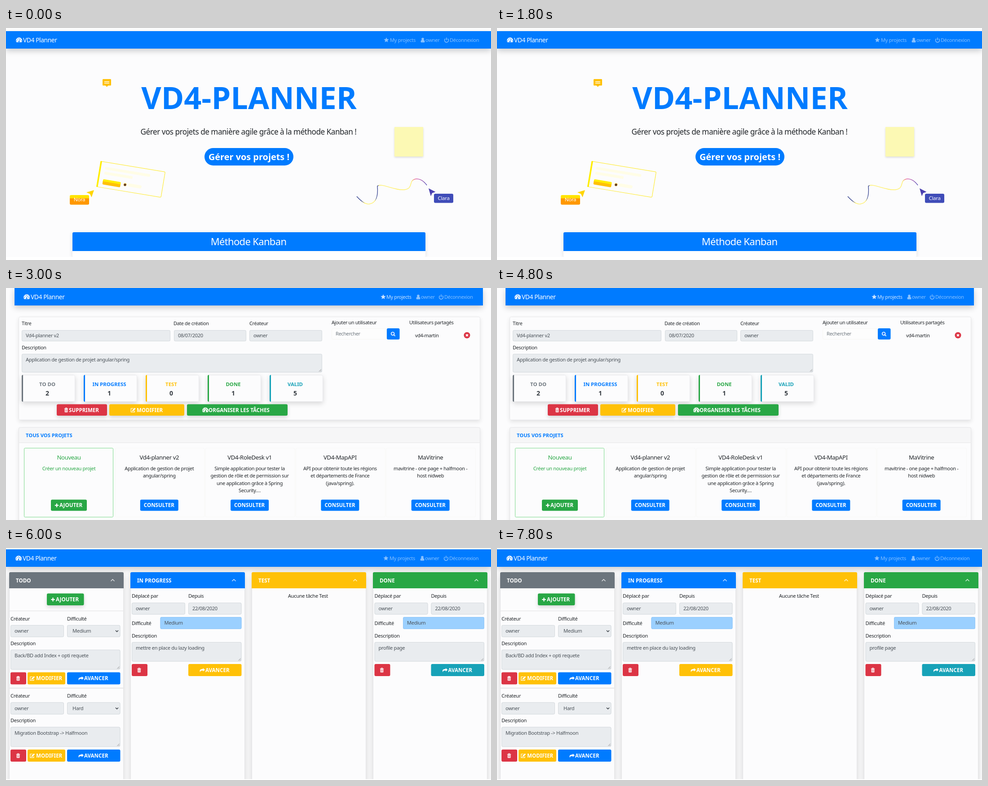
Animation of 1080x518 px, one loop 9 s. Source, as an HTML page with a canvas:

```html
<!DOCTYPE html>
<html lang="fr">
<head>
<meta charset="utf-8">
<title>Kanban</title>
<style>
html, body { margin: 0; width: 100%; height: 100%; overflow: hidden; background: #fcfcfd; }
canvas { display: block; width: 1080px; height: 518px; }
</style>
</head>
<body>
<canvas id="stage"></canvas>
<script>
const W = 1080, H = 518, HOLD = 3000;
const BLUE = '#007bff', GREEN = '#28a745', GOLD = '#ffc107', RED = '#dc3545';
const GREY = '#6c757d', TEAL = '#17a2b8', INK = '#212529', FIELD = '#495057';
const PAPER = '#fcfcfd';
const BRAND = 'VD4 Planner', USER = 'owner';

const canvas = document.getElementById('stage');
const ctx = canvas.getContext('2d');
const dpr = window.devicePixelRatio || 1;
canvas.width = W * dpr;
canvas.height = H * dpr;

// y is the middle of the capitals
function text(str, x, y, size, color = INK, { bold = false, align = 'left' } = {}) {
  ctx.font = `${bold ? 700 : 400} ${size}px "Noto Sans", "Open Sans", sans-serif`;
  ctx.letterSpacing = bold ? '0px' : `${-0.03 * size}px`;
  ctx.textAlign = align;
  ctx.fillStyle = color;
  ctx.fillText(str, x, y + size * 0.36);
}

const centered = (str, x, y, size, color, bold = false) =>
  text(str, x, y, size, color, { bold, align: 'center' });
const strong = (str, x, y, color = '#fff', size = 11.6) => text(str, x, y, size, color, { bold: true });

function box(x, y, w, h, fill, { r = 3, line, shadow = 0, alpha = 0.15, drop = 4 } = {}) {
  ctx.save();
  if (shadow) {
    ctx.shadowColor = `rgba(0,0,0,${alpha})`;
    ctx.shadowBlur = shadow * dpr;
    ctx.shadowOffsetY = drop * dpr;
  }
  ctx.beginPath();
  ctx.roundRect(x, y, w, h, r);
  ctx.fillStyle = fill;
  ctx.fill();
  ctx.restore();
  if (line) {
    ctx.beginPath();
    ctx.roundRect(x + 0.5, y + 0.5, w - 1, h - 1, r);
    ctx.strokeStyle = line;
    ctx.lineWidth = 1;
    ctx.stroke();
  }
}

function path(points, close = false) {
  ctx.beginPath();
  points.forEach(([x, y], i) => i ? ctx.lineTo(x, y) : ctx.moveTo(x, y));
  if (close) ctx.closePath();
}

function fillPath(points, color) {
  path(points, true);
  ctx.fillStyle = color;
  ctx.fill();
}

function dot(x, y, r, color) {
  ctx.beginPath();
  ctx.arc(x, y, r, 0, Math.PI * 2);
  if (color) ctx.fillStyle = color;
  ctx.fill();
}

// Icons are drawn around the origin
const icons = {
  gauge(color, back) {
    ctx.beginPath();
    ctx.arc(0, 1, 6.8, Math.PI * 0.82, Math.PI * 2.18);
    ctx.closePath();
    ctx.fill();
    ctx.fillStyle = back;
    for (const a of [1, 1.25, 1.5, 1.75, 2]) {
      dot(4.7 * Math.cos(a * Math.PI), 1.4 + 4.7 * Math.sin(a * Math.PI), 0.95);
    }
    dot(0, 3, 1.6);
    ctx.strokeStyle = back;
    path([[0, 3], [1.2, -1.8]]);
    ctx.stroke();
  },
  star() {
    const pts = Array.from({ length: 10 }, (_, i) => {
      const r = i % 2 ? 2.7 : 6, a = (i / 5 - 0.5) * Math.PI;
      return [r * Math.cos(a), r * Math.sin(a)];
    });
    path(pts, true);
    ctx.fill();
  },
  user() {
    dot(0, -2.4, 2.8);
    ctx.beginPath();
    ctx.roundRect(-4.4, -0.3, 8.8, 5.5, [3, 3, 1.5, 1.5]);
    ctx.fill();
  },
  power() {
    ctx.lineWidth = 1.6;
    ctx.beginPath();
    ctx.arc(0, 0.5, 4.4, -Math.PI * 0.28, Math.PI * 1.28);
    ctx.moveTo(0, -5.4);
    ctx.lineTo(0, 0);
    ctx.stroke();
  },
  trash(color, back) {
    ctx.fillRect(-4.2, -3.7, 8.4, 1.3);
    ctx.strokeRect(-1.6, -4.8, 3.2, 1.5);
    ctx.beginPath();
    ctx.roundRect(-3.4, -2, 6.8, 7, 1);
    ctx.fill();
    ctx.fillStyle = back;
    for (const x of [-1.8, 0, 1.8]) ctx.fillRect(x - 0.35, -0.8, 0.7, 4.4);
  },
  edit() {
    ctx.lineWidth = 1.2;
    path([[1, -3.8], [-4.6, -3.8], [-4.6, 4.4], [3.4, 4.4], [3.4, 1.2]]);
    ctx.stroke();
    path([[3.6, -5], [5.6, -3], [0.4, 2.2], [-2, 2.6], [-1.6, 0.2]], true);
    ctx.fill();
  },
  share() {
    ctx.beginPath();
    ctx.moveTo(6, -0.9);
    ctx.lineTo(1.6, -4.8);
    ctx.lineTo(1.6, -2.6);
    ctx.bezierCurveTo(-5, -2.6, -7, 0, -4.4, 4.8);
    ctx.bezierCurveTo(-4.6, 1.4, -2.6, 0.8, 1.6, 0.8);
    ctx.lineTo(1.6, 3);
    ctx.closePath();
    ctx.fill();
  },
  plus() {
    ctx.fillRect(-4.2, -1.1, 8.4, 2.2);
    ctx.fillRect(-1.1, -4.2, 2.2, 8.4);
  },
  search() {
    ctx.lineWidth = 1.7;
    ctx.beginPath();
    ctx.arc(-0.9, -0.9, 3.4, 0, Math.PI * 2);
    ctx.moveTo(1.7, 1.7);
    ctx.lineTo(4.6, 4.6);
    ctx.stroke();
  },
  cross() {
    ctx.lineWidth = 2;
    path([[-2.3, -2.3], [2.3, 2.3]]);
    ctx.stroke();
    path([[2.3, -2.3], [-2.3, 2.3]]);
    ctx.stroke();
  },
  up() {
    ctx.lineWidth = 1.3;
    path([[-4, 2], [0, -2], [4, 2]]);
    ctx.stroke();
  },
  down() {
    ctx.lineWidth = 1.5;
    path([[-3, -1.5], [0, 1.5], [3, -1.5]]);
    ctx.stroke();
  }
};

function icon(name, x, y, color = '#fff', back = BLUE) {
  ctx.save();
  ctx.translate(x, y);
  ctx.fillStyle = ctx.strokeStyle = color;
  ctx.lineWidth = 1;
  icons[name](color, back);
  ctx.restore();
}

function button(x, y, w, h, fill, label, labelX, sign, signX, shadow = 0) {
  box(x, y, w, h, fill, { shadow });
  const mid = y + h / 2 + 0.3;
  if (sign) icon(sign, signX, mid, '#fff', fill);
  if (label) strong(label, labelX, mid);
}

function navbar(x, y, w, h, left, links, size, glow) {
  box(x, y, w, h, BLUE, { r: 0, shadow: 14, alpha: 0.2, drop: 5 });
  const mid = y + h / 2 + 0.5;
  icon('gauge', left, mid);
  text(BRAND, left + 9, mid, 13.8, '#fff');
  const soft = 'rgba(255,255,255,.52)';
  const items = [['star', 'My projects', glow], ['user', USER, soft], ['power', 'Déconnexion', soft]];
  items.forEach(([sign, label, color], i) => {
    const [iconX, labelX] = links[i];
    icon(sign, iconX, mid, color);
    text(label, labelX, mid, size, color);
  });
}

function field(x, y, w, h, value, { fill = '#e9ecef', line = '#d5dade', textY = y + h / 2, inset = 9 } = {}) {
  box(x, y, w, h, fill, { line });
  text(value, x + inset, textY, 11.1, FIELD);
}

function area(x, y, w, h, value) {
  field(x, y, w, h, value, { textY: y + 13.5 });
  ctx.strokeStyle = '#777';
  ctx.lineWidth = 0.8;
  for (const d of [7, 4]) {
    path([[x + w - d, y + h - 2], [x + w - 2, y + h - d]]);
    ctx.stroke();
  }
}

function tag(x, y, w, h, name, fill) {
  box(x, y, w, h, fill, { r: 3 });
  centered(name, x + w / 2, y + h / 2 - 0.5, 11.6, '#fff');
}

function miniCard() {
  ctx.save();
  ctx.translate(211, 297);
  ctx.rotate(Math.atan2(24, 144));
  box(0, 0, 146, 58.5, PAPER, { r: 2, line: '#ffe91a' });
  box(-0.5, 0, 3.5, 58.5, '#ffee00', { r: 1 });
  box(12, 11, 102, 6, '#fffde6', { r: 2 });
  box(12, 22, 64, 6, '#fffde6', { r: 2 });
  box(12, 39, 40, 6, '#ffee00', { r: [2, 2, 0, 0] });
  box(12, 44, 40, 7, GOLD, { r: [0, 0, 2, 2] });
  dot(62, 43, 3.6, '#ffe37a');
  dot(62, 43.5, 2.6, '#5b3524');
  box(69, 39, 30, 7, '#fffde6');
  ctx.restore();
}

function squiggle() {
  const ink = ctx.createLinearGradient(780, 0, 938, 0);
  const stops = [[0, '#34418f'], [0.07, '#34418f'], [0.12, '#fff06a'], [0.26, '#fff06a'], [0.285, '#34418f'],
    [0.305, '#34418f'], [0.32, '#fff06a'], [0.78, '#fff06a'], [0.84, '#e0459a'], [1, '#3f3fb0']];
  stops.forEach(([at, color]) => ink.addColorStop(at, color));
  ctx.strokeStyle = ink;
  ctx.lineWidth = 1.4;
  ctx.beginPath();
  ctx.moveTo(781, 376);
  ctx.bezierCurveTo(790, 386, 800, 394, 809, 393);
  ctx.bezierCurveTo(824, 391, 829, 375, 827, 353);
  ctx.bezierCurveTo(836, 345, 866, 364, 888, 361);
  ctx.bezierCurveTo(907, 358, 897, 342, 909, 338);
  ctx.bezierCurveTo(919, 334, 930, 341, 937, 351);
  ctx.stroke();
}

function home() {
  ctx.fillStyle = '#fff';
  ctx.fillRect(0, 0, W, 7);
  navbar(0, 7, W, 39, 29, [[847, 855], [928, 934], [981, 988]], 11.2, 'rgba(255,255,255,.52)');

  box(215, 114, 19, 14.5, GOLD, { r: 1.5 });
  fillPath([[221, 128], [228, 128], [224.5, 131.5]], GOLD);
  ctx.fillStyle = '#fff';
  ctx.fillRect(219, 119, 11, 1.5);
  ctx.fillRect(219, 122.5, 11, 1.5);

  centered('VD4-PLANNER', 541, 156, 68.4, BLUE, true);
  centered('Gérer vos projets de manière agile grâce à la méthode Kanban !', 540, 232, 17.2, INK);
  box(442, 268, 198, 39, BLUE, { r: 19.5 });
  centered('Gérer vos projets !', 541, 288, 19.9, '#fff', true);

  box(865, 221, 64, 66, '#fcf9b4', { r: 1, shadow: 4, alpha: 0.14, drop: 2 });
  miniCard();
  fillPath([[196, 362], [179, 367], [187, 370.5], [190.5, 378]], '#ffd500');
  const warm = ctx.createLinearGradient(0, 373, 0, 395);
  warm.addColorStop(0, '#ffe600');
  warm.addColorStop(0.3, '#ffe000');
  warm.addColorStop(0.36, '#ff9800');
  warm.addColorStop(1, '#ff9800');
  tag(142, 373, 43, 21.5, 'Nora', warm);

  squiggle();
  fillPath([[941, 358], [956.5, 366], [949, 368.5], [946, 375.5]], '#4a40b0');
  tag(953, 370, 43, 20.5, 'Clara', '#3f4cb8');

  box(148, 456, 786, 55, '#fff', { r: 2, shadow: 10, alpha: 0.12, drop: 2 });
  box(148, 456, 786, 42, BLUE, { r: [3, 3, 0, 0] });
  centered('Méthode Kanban', 540, 477, 22, '#fff');
  ctx.fillStyle = '#fff';
  ctx.fillRect(0, 511, W, 7);
}

function counter(i, label, count, color) {
  const x = 35 + i * 138;
  box(x, 194, 119, 60, PAPER, { line: '#e9e9ec', shadow: 12 });
  box(x, 194, 3, 60, color, { r: [3, 0, 0, 3] });
  centered(label, x + 57, 215, 11.4, color, true);
  centered(count, x + 57, 234.5, 14, '#343a40', true);
}

function tile(i, title, lines) {
  const x = 140 + i * 201.3, fresh = i === 0;
  if (fresh) box(40, 357, 199, 155, PAPER, { r: 2, line: '#7bd98a' });
  else box(x - 99, 357, 200, 155, PAPER, { line: '#f8f8f6' });
  const color = fresh ? GREEN : INK;
  centered(title, x, 378, 13.2, color);
  lines.forEach((line, k) => centered(line, x, 403 + k * 16.4, 11, color));
  if (fresh) button(100, 472.5, 80, 25, GREEN, 'AJOUTER', 119, 'plus', 113);
  else button(x - 42.5, 472.5, 85, 25, BLUE, 'CONSULTER', x - 34.5);
}

function project() {
  navbar(19, 0, 1043, 39, 46, [[840, 847], [918, 924], [969, 976]], 10.9, 'rgba(255,255,255,.8)');
  box(28, 64, 1028, 231, PAPER, { line: '#e8e8ea', shadow: 10, alpha: 0.1 });

  const labels = [['Titre', 35, 79], ['Date de création', 373, 79], ['Créateur', 542, 79],
    ['Description', 35, 133], ['Ajouter un utilisateur', 725, 77.5], ['Utilisateurs partagés', 898, 77.5]];
  labels.forEach(([label, x, y]) => text(label, x, y, 10.8));
  field(35, 94, 331, 25, 'Vd4-planner v2');
  field(374, 94, 161, 25, '08/07/2020');
  field(542, 94, 162, 25, USER);
  area(35, 147, 669, 41.5, 'Application de gestion de projet angular/spring');

  box(725, 90, 123, 25, '#fdfdfd', { line: '#f6f6f3' });
  text('Rechercher', 734, 102.5, 10.9, GREY);
  button(848, 90, 28.5, 25, BLUE, '', 0, 'search', 862);
  text('vd4-martin', 911, 106, 10.8);
  dot(1026.5, 105.5, 7, RED);
  icon('cross', 1026.5, 105.5);

  const counts = [['TO DO', '2', GREY], ['IN PROGRESS', '1', BLUE], ['TEST', '0', GOLD],
    ['DONE', '1', GREEN], ['VALID', '5', TEAL]];
  counts.forEach((c, i) => counter(i, ...c));
  button(113, 259.5, 112, 25.5, RED, 'SUPPRIMER', 140, 'trash', 134, 8);
  button(230, 259.5, 167, 25.5, GOLD, 'MODIFIER', 291, 'edit', 283, 8);
  button(403, 259.5, 224, 25.5, GREEN, 'ORGANISER LES TÂCHES', 451, 'gauge', 444, 8);

  box(28, 311, 1028, 230, PAPER, { line: '#e4e4e6', shadow: 10, alpha: 0.1 });
  box(28, 311, 1028, 35, '#f6f6f7', { r: [3, 3, 0, 0], line: '#e6e6e8' });
  strong('TOUS VOS PROJETS', 44, 329, BLUE, 11.2);
  const tiles = [
    ['Nouveau', ['Créer un nouveau projet']],
    ['Vd4-planner v2', ['Application de gestion de projet', 'angular/spring']],
    ['VD4-RoleDesk v1', ['Simple application pour tester la', 'gestion de rôle et de permission sur',
      'une application grâce à Spring', 'Security.…']],
    ['VD4-MapAPI', ['API pour obtenir toute les régions', 'et départements de France', '(java/spring).']],
    ['MaVitrine', ['mavitrine - one page + halfmoon -', 'host nidweb']]
  ];
  tiles.forEach((t, i) => tile(i, ...t));
}

function column(x, title, color) {
  box(x, 54, 255, 480, PAPER, { line: '#e6e6e8', shadow: 14, alpha: 0.16 });
  box(x, 54, 255, 36, color, { r: [3, 3, 0, 0] });
  strong(title, x + 15, 72.5);
  icon('up', x + 230.5, 72, 'rgba(255,255,255,.85)');
}

function todo(y, level, note) {
  text('Créateur', 10, y, 11.1);
  text('Difficulté', 136, y, 11.1);
  field(10, y + 14, 119, 27, USER);
  field(136, y + 14, 118.5, 27, level, { inset: 12 });
  icon('down', 247, y + 27.5, '#343a40');
  text('Description', 10, y + 55, 11.1);
  area(10, y + 69, 244.5, 44.5, note);
  button(10, y + 119.5, 35, 27, RED, '', 0, 'trash', 27);
  button(48, y + 119.5, 84, 27, GOLD, 'MODIFIER', 67, 'edit', 58.5);
  button(136, y + 119.5, 118.5, 27, BLUE, 'AVANCER', 174, 'share', 167);
}

function task(x, note, next) {
  text('Déplacé par', x, 107, 11.1);
  text('Depuis', x + 126, 107, 11.1);
  field(x, 122, 119, 26.5, USER);
  field(x + 126, 122, 118.5, 26.5, '22/08/2020');
  text('Difficulté', x, 168, 11.1);
  field(x + 63.5, 154, 181, 27, 'Medium', { fill: '#9bd0ff', line: '#8fc6f8' });
  text('Description', x, 196, 11.1);
  area(x, 210, 244.5, 43.5, note);
  button(x, 259, 35, 27, RED, '', 0, 'trash', x + 16.5);
  button(x + 126, 259, 118.5, 27, next, 'AVANCER', x + 164, 'share', x + 157);
}

function board() {
  navbar(0, 3, W, 39, 28, [[846, 854], [927, 933], [980, 987]], 11.2, 'rgba(255,255,255,.52)');
  const heads = [['TODO', GREY], ['IN PROGRESS', BLUE], ['TEST', GOLD], ['DONE', GREEN]];
  heads.forEach((h, i) => column(7 + i * 270, ...h));

  button(91, 101.5, 82.5, 26.5, GREEN, 'AJOUTER', 111, 'plus', 104.5, 8);
  ctx.fillStyle = '#e0e0e2';
  ctx.fillRect(8, 140, 253, 1);
  ctx.fillRect(8, 312, 253, 1.5);
  todo(158, 'Medium', 'Back/BD add Index + opti requete');
  todo(330.5, 'Hard', 'Migration Bootstrap -> Halfmoon');
  task(280, 'mettre en place du lazy loading', GOLD);
  centered('Aucune tâche Test', 672.5, 107, 11.1, INK);
  task(820.5, 'profile page', TEAL);
  ctx.fillStyle = '#fff';
  ctx.fillRect(0, 516, W, 2);
}

const scenes = [home, project, board];

function draw(now) {
  ctx.setTransform(dpr, 0, 0, dpr, 0, 0);
  ctx.fillStyle = PAPER;
  ctx.fillRect(0, 0, W, H);
  scenes[Math.floor(now / HOLD) % scenes.length]();
}

const start = performance.now();
function tick() {
  draw(performance.now() - start);
  requestAnimationFrame(tick);
}
tick();
</script>
</body>
</html>
```
